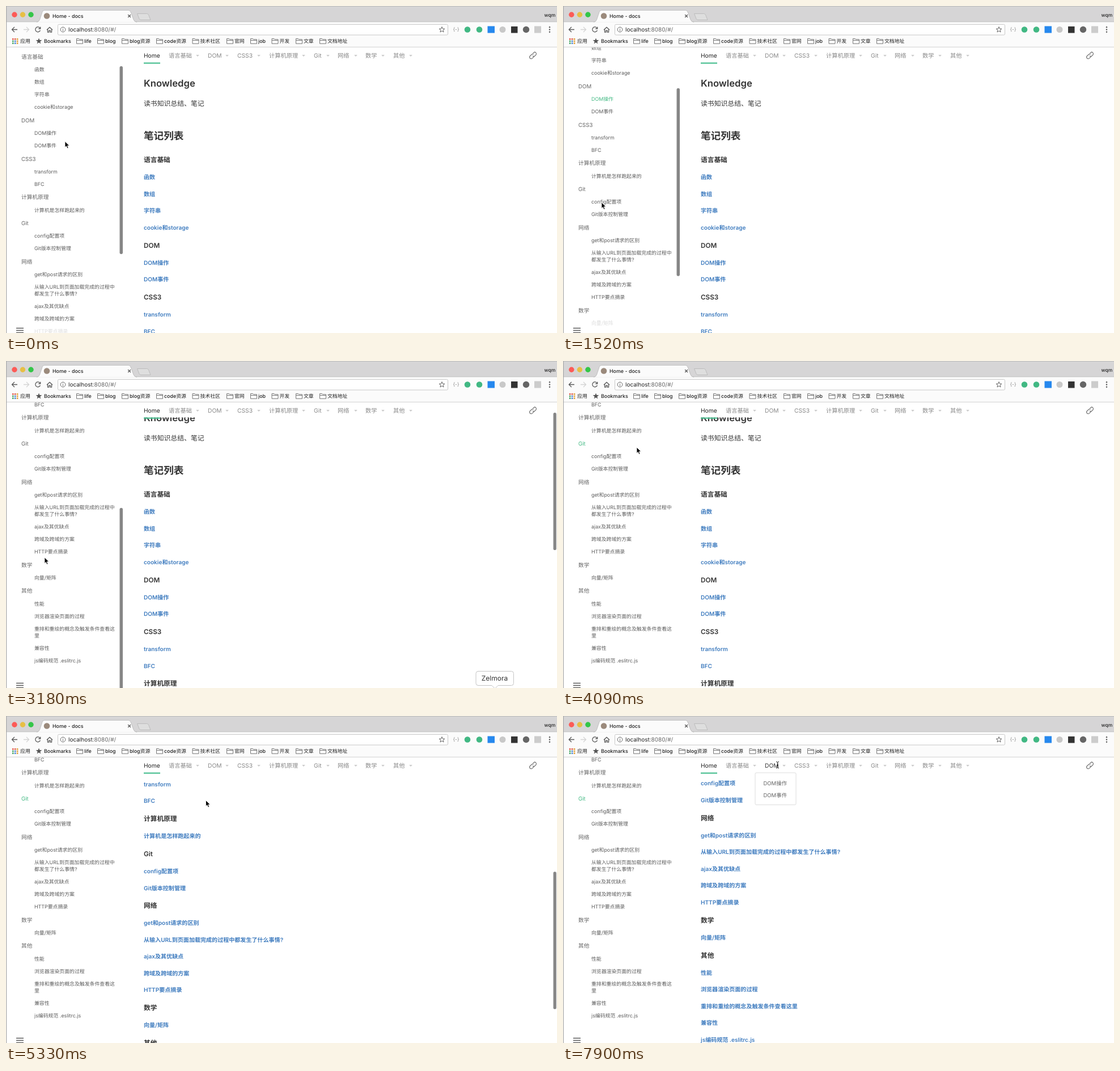
An HTML page that plays this animation: 972x576 px, repeating every 8 s.

```html
<!DOCTYPE html>
<html lang="zh">
<head>
<meta charset="utf-8">
<title>Home - docs</title>
<style>
  html, body { margin: 0; width: 100%; height: 100%; overflow: hidden; background: #fff; }
  svg { display: block; width: 972px; height: 576px; font-family: Inter, "Noto Sans CJK SC", "Noto Sans CJK", sans-serif; }
  text { white-space: pre; text-rendering: geometricPrecision; }
  .line { fill: none; stroke: #5a5a5a; stroke-width: 1.3; }
  .thumb { fill: #868686; }
  .active { fill: #42b983; }
</style>
</head>
<body>
<svg id="stage" viewBox="0 0 972 576"></svg>
<script>
const SECTIONS = [
  ['语言基础', '函数', '数组', '字符串', 'cookie和storage'],
  ['DOM', 'DOM操作', 'DOM事件'],
  ['CSS3', 'transform', 'BFC'],
  ['计算机原理', '计算机是怎样跑起来的'],
  ['Git', 'config配置项', 'Git版本控制管理'],
  ['网络', 'get和post请求的区别', '从输入URL到页面加载完成的过程中|都发生了什么事情?',
    'ajax及其优缺点', '跨域及跨域的方案', 'HTTP要点摘录'],
  ['数学', '向量/矩阵'],
  ['其他', '性能', '浏览器渲染页面的过程', '重排和重绘的概念及触发条件查看这|里',
    '兼容性', 'js编码规范 .eslitrc.js'],
];

// Text placed by its left edge and vertical centre.
const text = (x, y, size, fill, content, extra = '') =>
  `<text x="${x}" y="${(y + size * 0.365).toFixed(2)}" font-size="${size}" fill="${fill}" ${extra}>${content}</text>`;
const rect = (x, y, w, h, fill, extra = '') =>
  `<rect x="${x}" y="${y}" width="${w}" height="${h}" fill="${fill}" ${extra}/>`;
const circle = (x, y, r, fill, extra = '') =>
  `<circle cx="${x}" cy="${y}" r="${r}" fill="${fill}" ${extra}/>`;
const line = (d, extra = '') => `<path class="line" d="${d}" ${extra}/>`;
const bold = 'font-weight="600"';
const medium = 'font-weight="500"';

function star(cx, cy, r, style) {
  const points = Array.from({ length: 10 }, (_, i) => {
    const a = i * Math.PI / 5, d = i % 2 ? r * 0.42 : r;
    return `${(cx + d * Math.sin(a)).toFixed(2)},${(cy - d * Math.cos(a)).toFixed(2)}`;
  });
  return `<polygon points="${points.join(' ')}" ${style}/>`;
}

function article() {
  let y = 271;
  let out = text(243, 135.5, 16.7, '#333', 'Knowledge', bold)
    + text(243, 172, 11.85, '#333', '读书知识总结、笔记')
    + text(243, 229, 17.6, '#333', '笔记列表', bold);
  for (const [title, ...links] of SECTIONS) {
    out += text(243, y, 11.7, '#333', title, bold);
    links.forEach((link, i) => {
      y += i ? 29.5 : 30.7;
      out += text(243, y, 10.05, '#3f7cbf', link.replace('|', ''), bold);
    });
    y += 31.2;
  }
  return out;
}

function sidebar() {
  let y = 89.5, out = '';
  for (const [title, ...items] of SECTIONS) {
    out += text(27, y, 9.7, '#666', title);
    items.forEach((item, i) => {
      y += i ? 22.05 : 22.5;
      item.split('|').forEach((part, row) => {
        if (row) y += 12;
        out += text(50, y, 8.9, '#5c5c5c', part);
      });
    });
    y += 23.2;
  }
  return out;
}

function navigation() {
  const lefts = [287, 356, 408, 464, 543, 585, 634, 683];
  const arrows = [338, 390, 446, 525, 568, 617, 665, 714];
  const items = SECTIONS.map(([title], i) =>
    text(lefts[i], 87.5, 10.25, '#888', title, `id="nav${i}"`)
    + `<path d="M${arrows[i] - 2.8} 86h5.6l-2.8 3.2z" fill="#ccc"/>`).join('');
  return rect(222, 73, 742, 26.5, '#fff') + text(243, 87.5, 10.25, '#222', 'Home') + items
    + rect(243, 99.5, 29, 2.2, '#4abf91')
    + `<g transform="translate(929.5 87.5) rotate(-43)" fill="none" stroke="#777" stroke-width="1.2">
        <path d="M1 2.6h-5a2.8 2.8 0 0 1 0-5.6h4a2.8 2.8 0 0 1 2.6 2"/>
        <path d="M-.5-.4a2.8 2.8 0 0 0 2.6 3h2.5a2.8 2.8 0 0 0 0-5.6h-2"/></g>`;
}

function dropdown(id, x, width, items) {
  const rows = items.map((item, i) => text(x + 15, 118.5 + i * 20.7, 9.5, '#666', item)).join('');
  return `<g id="${id}">` + rect(x + .5, 100, width, 15 + items.length * 20.7, '#fff', 'stroke="#ddd" rx="2"') + rows + '</g>';
}

function browser() {
  const folders = [[124, 'life'], [161, 'blog'], [204, 'blog资源'], [265, 'code资源'], [328.5, '技术社区'],
    [389, '官网'], [431, 'job'], [468.5, '开发'], [511, '文章'], [553, '文档地址']];
  const folder = ([x, name]) =>
    `<path d="M${x + .5} 57.5h4l1.2 1.4h5.8v7.4h-11zM${x + .5} 60.5h11" fill="none" stroke="#777"/>`
    + text(x + 14, 62, 8.9, '#222', name, medium);
  const appColors = ['#e05b4b', '#e05b4b', '#e3a23a', '#4ba764', '#4d86d8', '#e3a23a', '#4ba764', '#4d86d8', '#e3a23a'];
  const apps = appColors.map((c, i) => rect(11 + i % 3 * 3.9, 57 + (i / 3 | 0) * 3.7, 2.6, 2.6, c)).join('');
  return rect(0, 0, 972, 73, '#fbfbfb') + rect(0, 0, 972, 28, '#d6d5d6') + rect(0, 0, 972, 1, '#bbb')
    + rect(0, 27.5, 972, .8, '#bcbcbc')
    + circle(15, 15.2, 4.7, '#fc5b57') + circle(29.5, 15.2, 4.7, '#e7bf45') + circle(44, 15.2, 4.7, '#34c648')
    + '<path d="M54 28.5Q58 28 59.5 24L64 10.5Q65 7.5 68 7.5H216Q219 7.5 220 10.5L225 24Q226.5 28 231 28.5" fill="#fbfbfb" stroke="#b5b5b5" stroke-width=".8"/>'
    + '<path d="M231.5 13.5h17q2 0 3 2l3.5 9h-17q-2 0-3-2z" fill="#dedede" stroke="#b5b5b5" stroke-width=".8"/>'
    + circle(72, 17.5, 5.3, '#9b8a7c') + text(82, 17.7, 8.9, '#222', 'Home - docs', medium)
    + line('M215.2 15.2l4.8 4.8m0-4.8l-4.8 4.8') + text(949.5, 16, 8.5, '#222', 'wqm', medium)
    + line('M20 41.5H10.5M15 37l-4.5 4.5L15 46') + line('M31 41.5h9.5M36 37l4.5 4.5L36 46', 'style="stroke:#d4d4d4"')
    + line('M60 39a4.4 4.4 0 1 0 .4 3.8M60.7 36.8v3.2h-3.4')
    + line('M72 42l5-4.6 5 4.6M73.5 41.5v4.6h2.3v-3h2.4v3h2.3v-4.6')
    + rect(91.5, 32.5, 688, 18.5, '#fff', 'rx="2" stroke="#c8c8c8"')
    + circle(100.5, 41.5, 4.3, 'none', 'stroke="#666"') + rect(100, 41, 1, 3, '#666') + rect(100, 39, 1, 1.1, '#666')
    + text(110, 41.8, 10, '#222', 'localhost<tspan fill="#666">:8080/#/</tspan>')
    + star(769, 41.8, 5.2, 'fill="none" stroke="#666"')
    + text(788.5, 41.3, 8.5, '#888', '{-}') + circle(814, 41.5, 5.3, '#41b883') + circle(835, 41.5, 5.3, '#41b883')
    + rect(849.5, 35.5, 12.5, 12, '#2688ee') + circle(876, 41.5, 5.5, '#c8c8c8') + rect(891, 36, 11.5, 11.5, '#333')
    + circle(917.5, 41.5, 5.7, '#666') + rect(932, 35.5, 12, 12, '#ccc')
    + [37.3, 41.5, 45.7].map(y => circle(959, y, 1.2, '#555')).join('')
    + apps + text(25, 62, 9, '#222', '应用', medium)
    + star(58, 62, 5.6, 'fill="#555"') + text(67, 62, 8.9, '#222', 'Bookmarks', medium)
    + folders.map(folder).join('') + rect(0, 71.8, 972, 1, '#d2d2d2');
}

const stage = document.getElementById('stage');
stage.innerHTML = rect(0, 0, 972, 576, '#fff')
  + `<g id="article">${article()}</g>` + navigation()
  + dropdown('menu0', 257, 113, SECTIONS[0].slice(1)) + dropdown('menu1', 338.5, 72, SECTIONS[1].slice(1))
  + `<g id="sidebar">${sidebar()}</g>`
  + rect(2, 555, 197, 21, '#fff', 'opacity=".8"')
  + line('M18 567.5h13M18 571.5h13M18 575.5h13')
  + rect(200.5, 0, 5.5, 331, '', 'rx="2.7" class="thumb" id="sideThumb"')
  + rect(965.5, 0, 5.3, 242, '', 'rx="2.6" class="thumb" id="mainThumb"')
  + browser() + rect(0, 0, 1.3, 576, '#b0b0b0')
  + '<g id="tooltip"><path d="M832.5 546.5h59q4 0 4 4v17q0 4-4 4h-23.5l-5.5 5.5-5.5-5.5h-24q-4 0-4-4v-17q0-4 4-4z" fill="#fff" stroke="#c4c4c4"/>'
  + text(862, 559, 12, '#333', 'Zelmora', 'text-anchor="middle"') + '</g>'
  + '<path id="arrow" d="M0 0v10.5l2.4-2.2 1.7 4 1.9-.8-1.7-3.9h3.4z" fill="#000" stroke="#fff" stroke-width=".8"/>'
  + '<path id="beam" d="M-2.5-5.5q2.5 0 2.5 2v7.5q0 2-2.5 2M2.5-5.5q-2.5 0-2.5 2v7.5q0 2 2.5 2M-1.5 1.5h3" fill="none" stroke="#222"/>';

const el = id => document.getElementById(id);
const sideEntry = label => [...el('sidebar').children].find(e => e.textContent === label);
const domEntry = sideEntry('DOM操作'), gitEntry = sideEntry('Git');

// Runs of evenly spaced picture changes: first, last, count.
const CHANGES = [[560, 1520, 6], [1700, 2230, 4], [2470, 2650, 2], [2830, 3710, 6], [3890, 4800, 6],
  [4980, 5950, 6], [6120, 7150, 7], [7360, 7900, 4]]
  .flatMap(([a, b, n]) => Array.from({ length: n }, (_, i) => Math.floor((a + (b - a) * i / (n - 1)) / 10) * 10));

const SIDE_SCROLL = [[920, 0], [1520, 60], [2230, 175], [2470, 175], [3010, 237]];
const MAIN_SCROLL = [[3000, 0], [3180, 36], [4250, 36], [4800, 260], [5520, 578]];
const POINTER = [[500, 104, 238.5], [740, 100, 226], [1320, 68, 346], [3540, 68, 346], [4070, 130, 152],
  [4610, 352.5, 148.5], [5600, 352.5, 148.5], [6290, 317.5, 82], [6800, 322, 125], [7360, 335, 88], [7720, 378.5, 86]];

function track(keys, t, column = 1) {
  const next = keys.findIndex(k => k[0] > t);
  if (next < 0) return keys[keys.length - 1][column];
  if (next === 0) return keys[0][column];
  const a = keys[next - 1], b = keys[next];
  return a[column] + (b[column] - a[column]) * (t - a[0]) / (b[0] - a[0]);
}

const show = (id, visible) => el(id).setAttribute('visibility', visible ? 'visible' : 'hidden');
const move = (id, x, y) => el(id).setAttribute('transform', `translate(${x} ${y})`);

function draw(time) {
  const t = CHANGES.reduce((last, c) => c <= time ? c : last, 0);
  const side = track(SIDE_SCROLL, t), main = track(MAIN_SCROLL, t);
  const x = track(POINTER, t), y = track(POINTER, t, 2);
  const firstMenu = t >= 6400 && t < 7360, secondMenu = t >= 7360;

  move('sidebar', 0, -side);
  move('article', 0, -main);
  move('sideThumb', 0, 106 + side * 0.645);
  move('mainThumb', 0, 74 + main * 0.473);
  show('sideThumb', t < 4070);
  show('mainThumb', t >= 3000 && t < 4070 || t >= 4250 && t < 6120);
  show('tooltip', t >= 3000 && t < 3500);
  show('menu0', firstMenu);
  show('menu1', secondMenu);
  el('nav0').setAttribute('fill', firstMenu ? '#333' : '#888');
  el('nav1').setAttribute('fill', secondMenu ? '#333' : '#888');
  domEntry.classList.toggle('active', t >= 740 && t < 1700);
  gitEntry.classList.toggle('active', t >= 4070);

  const overText = t >= 7700;
  show('arrow', !overText);
  show('beam', overText);
  move(overText ? 'beam' : 'arrow', x, y);
}

const start = performance.now();
function frame() {
  draw((performance.now() - start) % 8000);
  requestAnimationFrame(frame);
}
frame();
</script>
</body>
</html>
```
